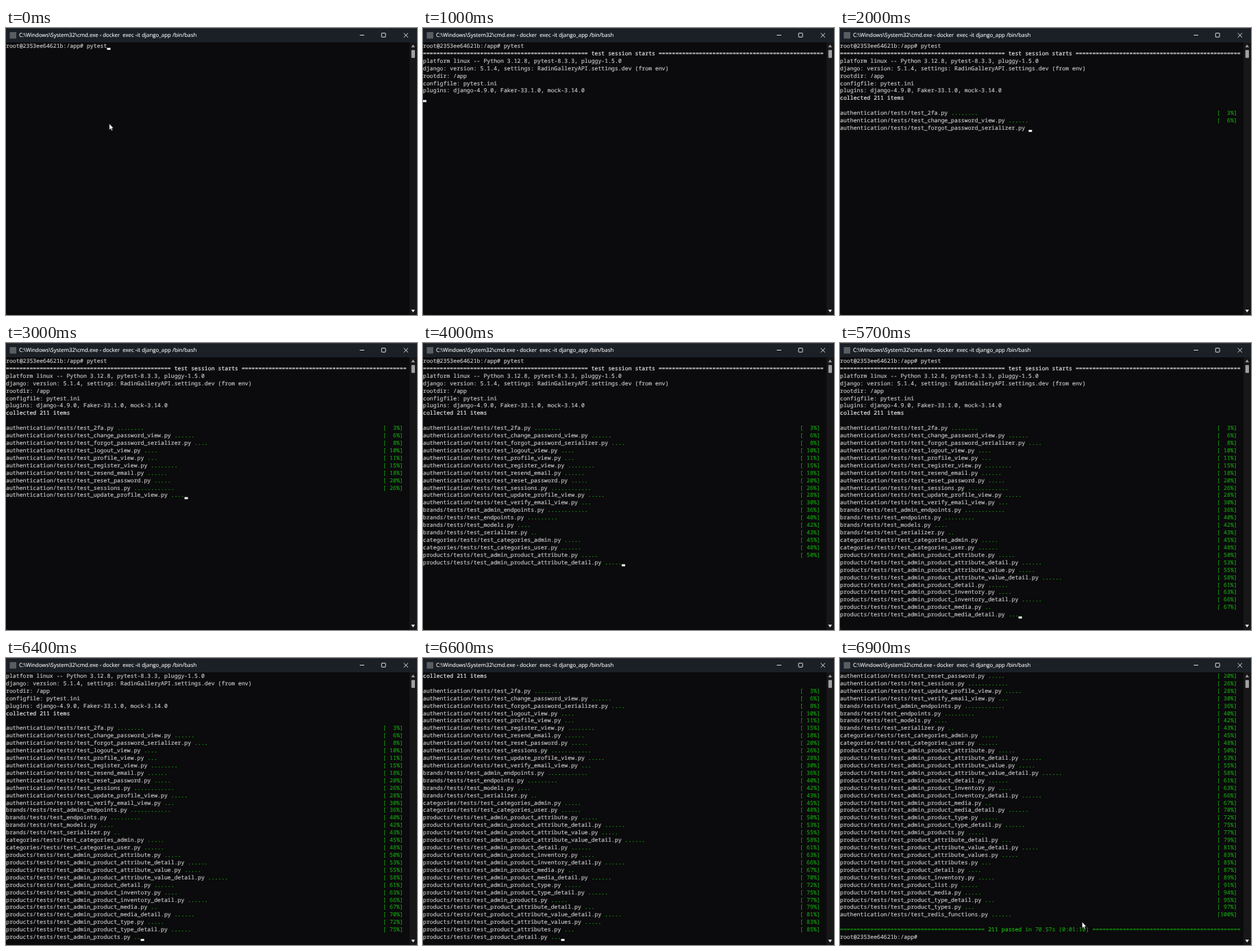
An HTML page that plays this animation: 600x420 px, repeating every 7000 ms.

```html
<!DOCTYPE html>
<html lang="en">
<head>
<meta charset="utf-8">
<title>Terminal test run</title>
<style>
  html, body { margin: 0; width: 100%; height: 100%; overflow: hidden; background: #2a2a2a; }
  #stage { position: relative; width: 600px; height: 420px; overflow: hidden; border-radius: 4px; background: #0b0a0c; }
  #bar { position: absolute; inset: 0 0 auto; height: 20px; border-top: 1px solid #34383d; background: #1b2027; }
  #title {
    position: absolute; left: 19px; top: 1px; white-space: pre;
    font: 7.9px/21px "Open Sans", sans-serif; color: #fff; text-rendering: geometricPrecision;
    -webkit-text-stroke: .1px;
  }
  #screen {
    position: absolute; left: 0; top: 21.9px; margin: 0; color: #ccc;
    font: 8.195px/10.917px "Noto Sans Mono", monospace;
    font-variant-ligatures: none; text-rendering: geometricPrecision;
    -webkit-text-stroke: .15px;
  }
  #screen .w { color: #f2f2f2; }
  #screen .g { color: #13a10e; }
  #screen .b { color: #16c60c; }
  #screen .dots { color: #13a10e; -webkit-text-stroke: .4px; }
  #caret { position: absolute; left: 0; top: 29.4px; width: 4.9px; height: 2.5px; background: #f2f2f2; }
  svg { position: absolute; inset: 0; }
</style>
</head>
<body>
<div id="stage">
  <div id="bar"></div>
  <div id="title">C:\Windows\System32\cmd.exe - docker  exec -it django_app /bin/bash</div>
  <pre id="screen"></pre>
  <div id="caret"></div>
  <svg width="600" height="420" viewBox="0 0 600 420">
    <rect x="5.5" y="6" width="9.5" height="9.5" fill="#5a5d61"/>
    <g fill="none" stroke="#f0f0f0" stroke-width=".9">
      <path d="M516.5 10.5h6.5M580.7 7.5l6.3 6.3M587 7.5l-6.3 6.3"/>
      <rect x="548.3" y="7.5" width="5.8" height="5.8" rx=".6"/>
    </g>
    <rect x="589" y="21" width="11" height="399" fill="#171717"/>
    <rect x="591.8" y="32.3" width="5.2" height="11.4" rx=".8" fill="#a0a0a0"/>
    <path d="M591.5 28.3l2.8-4 2.8 4z" fill="#a0a0a0"/>
    <path d="M591.5 412.3l2.8 4 2.8-4z" fill="#e8e8e8"/>
    <path id="mouse" d="M0 0V9.2L2.1 7.3 3.5 10.4 5 9.7 3.6 6.7H6.3Z" fill="#fff" stroke="#000" stroke-width=".5"/>
  </svg>
</div>
<script>
const LOOP = 7000, STEP = 100, ROWS = 36, COLS = 119;
const CELL_W = 4.917, CELL_H = 10.917;
const PROMPT = 'root@2353ee64621b:/app#';

// test module and its number of tests
const suites = {
  authentication: '2fa 8,change_password_view 6,forgot_password_serializer 4,logout_view 4,profile_view 3,' +
    'register_view 8,resend_email 6,reset_password 5,sessions 12,update_profile_view 5,verify_email_view 3',
  brands: 'admin_endpoints 12,endpoints 9,models 4,serializer 2',
  categories: 'categories_admin 5,categories_user 6',
  products: 'admin_product_attribute 5,admin_product_attribute_detail 6,admin_product_attribute_value 5,' +
    'admin_product_attribute_value_detail 6,admin_product_detail 6,admin_product_inventory 4,' +
    'admin_product_inventory_detail 6,admin_product_media 2,admin_product_media_detail 6,' +
    'admin_product_type 5,admin_product_type_detail 6,admin_products 5,product_attribute_detail 3,' +
    'product_attribute_value_detail 5,product_attribute_values 5,product_attributes 3,product_detail 4,' +
    'product_inventory 5,product_list 5,product_media 5,product_type_detail 3,product_types 3',
  'authentication ': 'redis_functions 6'
};
const files = Object.entries(suites).flatMap(([app, list]) => list.split(',').map(item => {
  const [name, count] = item.split(' ');
  return { path: `${app.trim()}/tests/test_${name}.py `, count: +count };
}));
const total = files.reduce((sum, f) => sum + f.count, 0);

// [ms, tests finished]
const pace = [[1500, 0], [2000, 14], [2300, 34], [3000, 60], [3100, 66], [3900, 108], [4000, 112],
  [4700, 124], [5500, 142], [5700, 145], [6400, 161], [6850, 211]];

function testsDone(t) {
  if (t <= pace[0][0]) return 0;
  const i = pace.findIndex(p => p[0] >= t);
  if (i < 0) return total;
  const [t0, n0] = pace[i - 1], [t1, n1] = pace[i];
  return Math.floor(n0 + (n1 - n0) * (t - t0) / (t1 - t0) + 1e-6);
}

const paint = (cls, text) => `<span class="${cls}">${text}</span>`;
const rule = n => '='.repeat(n);

const header = [
  paint('w', `${rule(49)} test session starts ${rule(49)}`),
  'platform linux -- Python 3.12.8, pytest-8.3.3, pluggy-1.5.0',
  'django: version: 5.1.4, settings: RadinGalleryAPI.settings.dev (from env)',
  'rootdir: /app',
  'configfile: pytest.ini',
  'plugins: django-4.9.0, Faker-33.1.0, mock-3.14.0'
];

// lines on the terminal and the caret column on the last one
function session(t) {
  const lines = [PROMPT + ' pytest'];
  if (t < 800) return { lines, col: 30 };
  lines.push(...header);
  if (t < 1200) return { lines: [...lines, ''], col: 0 };
  lines.push(paint('w', `collected ${total} items`), '');
  if (t < 1300) return { lines: [...lines, ''], col: 0 };

  const done = testsDone(t);
  let before = 0;
  for (const { path, count } of files) {
    const passed = Math.min(count, done - before);
    const line = path + paint('dots', '.'.repeat(passed));
    if (passed < count) return { lines: [...lines, line], col: path.length + passed };
    before += count;
    const pct = String(Math.floor(100 * before / total)).padStart(3);
    const gap = ' '.repeat(COLS - 7 - path.length - count);
    lines.push(line + gap + paint('g', `[${pct}%]`));
  }
  lines.push('',
    paint('g', rule(43) + ' ') + paint('b', `${total} passed`) + paint('g', ` in 70.57s (0:01:10) ${rule(44)}`),
    PROMPT);
  return { lines, col: PROMPT.length + 1 };
}

const [screenEl, caret, mouse] = ['screen', 'caret', 'mouse'].map(id => document.getElementById(id));

function draw(t) {
  const { lines, col } = session(t);
  const view = lines.slice(-ROWS);
  screenEl.innerHTML = view.join('\n');

  const caretOn = t < 300 || t === 400 || (t >= 800 && t < 6900);
  caret.style.visibility = caretOn ? 'visible' : 'hidden';
  caret.style.transform = `translate(${col * CELL_W}px, ${(view.length - 1) * CELL_H}px)`;

  const mouseOn = t < 300 || t >= 6900;
  mouse.setAttribute('visibility', mouseOn ? 'visible' : 'hidden');
  mouse.setAttribute('transform', t < 300 ? 'translate(150.8 140)' : 'translate(353.4 386.2)');
}

let last = -1;
function tick() {
  const t = Math.floor(performance.now() % LOOP / STEP) * STEP;
  if (t !== last) draw(last = t);
  requestAnimationFrame(tick);
}
tick();
</script>
</body>
</html>
```
